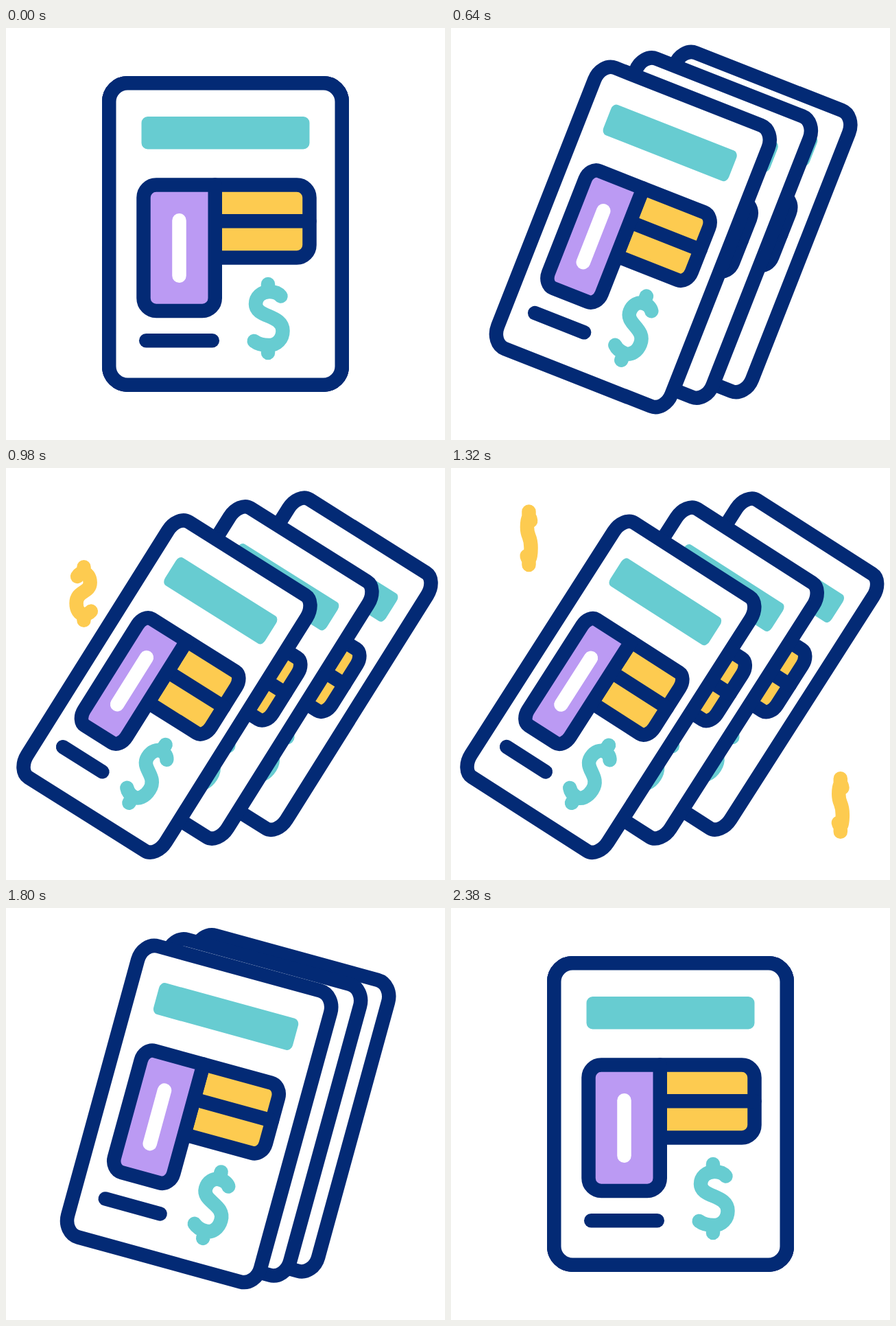
Animation, 640 px wide and 600 px high, one loop 2.4 s. Source, as an HTML page:

```html
<!DOCTYPE html>
<html lang="en">
<head>
<meta charset="utf-8">
<title>Payment bills</title>
<style>
  html, body { margin: 0; width: 100%; height: 100%; overflow: hidden; background: #fff; }
  svg { display: block; }
  svg * { vector-effect: non-scaling-stroke; }
  .line { stroke: #032a75; }
  .teal { stroke: #67ccd1; }
  .gold { stroke: #fdcb50; }
</style>
</head>
<body>
<svg width="640" height="600" viewBox="0 0 640 600" fill="none" stroke-width="20.5" stroke-linecap="round" stroke-linejoin="round">
  <defs>
    <path id="dollar" d="M400.5 390.5C397 386 390 384 384 384C372 384 364 392 364 402C364 422 403.5 417 403.5 441C403.5 453 395 462 383 462C374 462 367 460 361.7 456M382 373V384M382 462V473"/>
    <g id="card">
      <rect class="line" x="150.25" y="80.25" width="339.5" height="439.5" rx="27" fill="#fff"/>
      <rect x="197.5" y="129" width="245" height="47.5" rx="9" fill="#67ccd1"/>
      <path class="line" fill="#fdcb50" d="M304.75 228.5H424A18.5 18.5 0 0 1 442.5 247V316A18.5 18.5 0 0 1 424 334.5H304.75Z"/>
      <path class="line" d="M304.75 281.3H442.5"/>
      <path class="line" fill="#bb9af3" d="M304.75 228.5H219A18.5 18.5 0 0 0 200.5 247V393.5A18.5 18.5 0 0 0 219 412H286.25A18.5 18.5 0 0 0 304.75 393.5Z"/>
      <path stroke="#fff" d="M252.5 280.2V360.7"/>
      <path class="line" d="M204.25 455.3H300.75"/>
      <use href="#dollar" class="teal"/>
    </g>
  </defs>
  <use href="#dollar" class="gold coin"/>
  <use href="#dollar" class="gold coin"/>
  <use href="#card" class="bill"/>
  <use href="#card" class="bill"/>
  <use href="#card" class="bill"/>
</svg>
<script>
const LOOP = 2400;
const bills = document.querySelectorAll('.bill');
const coins = document.querySelectorAll('.coin');

// Fan offsets, back to front
const fan = [[180, -33.5], [92, -20.5], [0, 0]];

// Each coin is tossed from behind the bills to its turning point and back
const tosses = [
  { x: 113.5, rest: 400, peak: 50, mid: 1190, half: 339 },
  { x: 567.8, rest: 185, peak: 546, mid: 1440, half: 305 }
];

// Symmetric cubic-bezier(a, 0, 1 - a, 1), solved by bisection
function ease(x, a = 0.77) {
  let lo = 0, hi = 1, s = 0.5;
  for (let i = 0; i < 24; i++) {
    s = (lo + hi) / 2;
    const at = 3 * a * s * (1 - s) ** 2 + 3 * (1 - a) * s * s * (1 - s) + s ** 3;
    if (at < x) lo = s; else hi = s;
  }
  return s * s * (3 - 2 * s);
}

function drawBills(t) {
  const x = t < 1195 ? t / 1190 : (2380 - t) / 1176;
  const p = ease(Math.max(0, Math.min(1, x)));
  bills.forEach((bill, i) => {
    const [dx, dy] = fan[i];
    bill.setAttribute('transform',
      `translate(${320 + (dx - 212.5) * p} ${530 + (dy - 17.6) * p}) rotate(${32.85 * p}) scale(${1 - 0.304 * p} 1) translate(-320 -530)`);
  });
}

function drawCoins(t) {
  const spin = 0.775 * Math.cos(2.28 + 0.00767 * (t - 980));
  coins.forEach((coin, i) => {
    const { x, rest, peak, mid, half } = tosses[i];
    const u = (t - mid) / half;
    const y = peak + (rest - peak) * u * u;
    coin.setAttribute('visibility', Math.abs(u) < 1 ? 'visible' : 'hidden');
    coin.setAttribute('transform', `translate(${x} ${y}) scale(${spin} 0.775) translate(-382 -423)`);
  });
}

function frame() {
  const t = performance.now() % LOOP;
  drawBills(t);
  drawCoins(t);
  requestAnimationFrame(frame);
}
frame();
</script>
</body>
</html>
```
